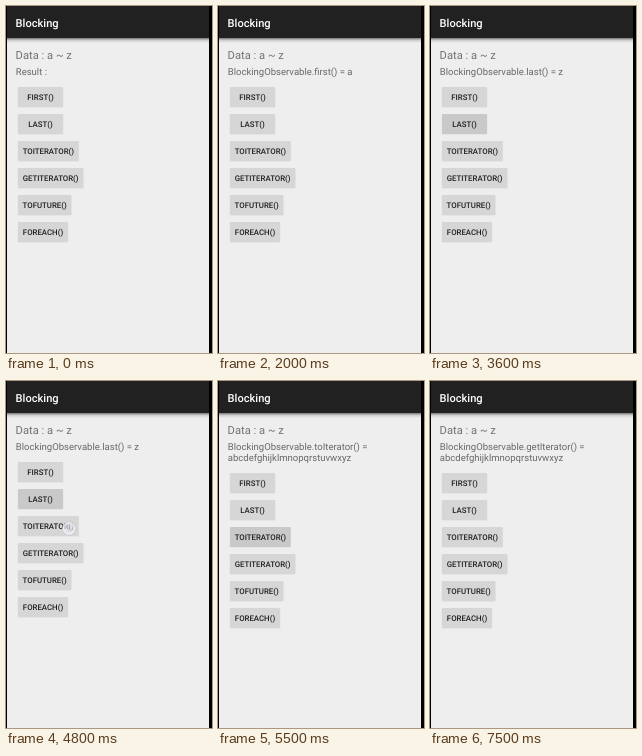
An HTML page that plays this animation: 206 px wide and 347 px high, repeating every 8000 ms.

```html
<!DOCTYPE html>
<html lang="en">
<head>
<meta charset="utf-8">
<title>Blocking</title>
<style>
html, body { margin: 0; width: 100%; height: 100%; overflow: hidden; background: #000; }
svg {
  display: block; width: 206px; height: 347px;
  font-family: Roboto, sans-serif; text-rendering: geometricPrecision;
}
.title { font-size: 11.1px; font-weight: 500; fill: #fff; }
.data { font-size: 11.2px; fill: #737373; }
.result { font-size: 9.52px; fill: #686868; }
.label { font-size: 7.84px; font-weight: 500; fill: #1f1f1f; text-anchor: middle; }
.button { fill: #d6d6d6; }
.edge { fill: #000; opacity: .05; }
.press { fill: #000; opacity: .06; }

/* one 8 s clock: 100 ms = 1.25% */
.result, .touch, .press, #list { animation: 8s step-end infinite; }
.result, .touch { opacity: 0; }

#r0 { animation-name: r0; }
#r1 { animation-name: r1; }
#r2 { animation-name: r2; }
#r3 { animation-name: r3; }
#r4 { animation-name: r4; }
@keyframes r0 { 0% { opacity: 1 } 22.5%, 100% { opacity: 0 } }
@keyframes r1 { 0% { opacity: 0 } 22.5% { opacity: 1 } 45%, 100% { opacity: 0 } }
@keyframes r2 { 0% { opacity: 0 } 45% { opacity: 1 } 68.75%, 100% { opacity: 0 } }
@keyframes r3 { 0% { opacity: 0 } 68.75% { opacity: 1 } 91.25%, 100% { opacity: 0 } }
@keyframes r4 { 0% { opacity: 0 } 91.25%, 100% { opacity: 1 } }

#list { animation-name: shift; }
@keyframes shift { 0% { transform: none } 68.75%, 100% { transform: translateY(11px) } }

#t0 { animation-name: t0; }
#t1 { animation-name: t1; }
#t2 { animation-name: t2; }
#t3 { animation-name: t3; }
@keyframes t0 {
  0% { opacity: 0 } 17.5% { opacity: 1 } 20% { opacity: .6 }
  21.25% { opacity: .25 } 22.5%, 100% { opacity: 0 }
}
@keyframes t1 {
  0% { opacity: 0 } 35% { opacity: 1 } 41.25% { opacity: .75 }
  42.5% { opacity: .5 } 43.75% { opacity: .25 } 45%, 100% { opacity: 0 }
}
@keyframes t2 {
  0% { opacity: 0 } 60% { opacity: 1 } 63.75% { opacity: .8 } 65% { opacity: .6 }
  66.25% { opacity: .4 } 67.5% { opacity: .25 } 68.75%, 100% { opacity: 0 }
}
@keyframes t3 {
  0% { opacity: 0 } 85% { opacity: 1 } 88.75% { opacity: .6 }
  90% { opacity: .25 } 91.25%, 100% { opacity: 0 }
}

/* ripple centres, measured from each button's corner */
#p0 { --at: 24.5px 9.5px; animation-name: p0; }
#p1 { --at: 27.5px 11.5px; animation-name: p1; }
#p2 { --at: 51px 12.5px; animation-name: p2; }
#p3 { --at: 52.5px 10.5px; animation-name: p3; }
@keyframes p0 {
  0% { clip-path: circle(0 at var(--at)) } 20% { clip-path: circle(16px at var(--at)) }
  21.25% { clip-path: circle(80px at var(--at)) } 25%, 100% { clip-path: circle(0 at var(--at)) }
}
@keyframes p1 {
  0% { clip-path: circle(0 at var(--at)) } 41.25% { clip-path: circle(12px at var(--at)) }
  42.5% { clip-path: circle(22px at var(--at)) } 43.75% { clip-path: circle(80px at var(--at)) }
  63.75%, 100% { clip-path: circle(0 at var(--at)) }
}
@keyframes p2 {
  0% { clip-path: circle(0 at var(--at)) } 63.75% { clip-path: circle(14px at var(--at)) }
  65% { clip-path: circle(28px at var(--at)) } 66.25% { clip-path: circle(45px at var(--at)) }
  67.5% { clip-path: circle(80px at var(--at)) } 71.25%, 100% { clip-path: circle(0 at var(--at)) }
}
@keyframes p3 {
  0% { clip-path: circle(0 at var(--at)) } 88.75% { clip-path: circle(24px at var(--at)) }
  90% { clip-path: circle(80px at var(--at)) } 93.75%, 100% { clip-path: circle(0 at var(--at)) }
}
</style>
</head>
<body>
<svg viewBox="0 0 206 347">
  <defs>
    <linearGradient id="shade" x2="0" y2="1">
      <stop stop-color="#000" stop-opacity=".5"/>
      <stop offset=".45" stop-color="#000" stop-opacity=".14"/>
      <stop offset="1" stop-color="#000" stop-opacity="0"/>
    </linearGradient>
    <radialGradient id="dot">
      <stop stop-color="#dcdee6" stop-opacity=".62"/>
      <stop offset=".55" stop-color="#e6e8f0" stop-opacity=".68"/>
      <stop offset=".8" stop-color="#fafaff" stop-opacity=".85"/>
      <stop offset="1" stop-color="#b6bac6" stop-opacity=".6"/>
    </radialGradient>
  </defs>
  <rect width="206" height="347"/>
  <rect x="1" width="202" height="347" fill="#eee"/>
  <rect x="1" width="202" height="32" fill="#212121"/>
  <rect x="1" y="32" width="202" height="5" fill="url(#shade)"/>
  <text class="title" x="9.6" y="21">Blocking</text>
  <text class="data" x="9.6" y="53.1">Data : a ~ z</text>

  <text class="result" id="r0" x="9.8" y="69.2">Result :</text>
  <text class="result" id="r1" x="9.8" y="69.2">BlockingObservable.first() = a</text>
  <text class="result" id="r2" x="9.8" y="69.2">BlockingObservable.last() = z</text>
  <text class="result" id="r3" x="9.8" y="69.2">BlockingObservable.toIterator() =<tspan x="9.8" dy="11">abcdefghijklmnopqrstuvwxyz</tspan></text>
  <text class="result" id="r4" x="9.8" y="69.2">BlockingObservable.getIterator() =<tspan x="9.8" dy="11">abcdefghijklmnopqrstuvwxyz</tspan></text>

  <g id="list"></g>

  <g fill="url(#dot)">
    <circle class="touch" id="t0" cx="36.5" cy="90.5" r="7"/>
    <circle class="touch" id="t1" cx="39.5" cy="119.5" r="7"/>
    <circle class="touch" id="t2" cx="63" cy="147.5" r="7"/>
    <circle class="touch" id="t3" cx="64.5" cy="183.5" r="7"/>
  </g>
</svg>
<script>
const buttons = [
  ["FIRST()", 45], ["LAST()", 45], ["TOITERATOR()", 60.7],
  ["GETITERATOR()", 65.3], ["TOFUTURE()", 53.3], ["FOREACH()", 50]
];

document.getElementById("list").innerHTML = buttons.map(([label, w], i) => {
  const y = 81 + 27 * i;
  const box = `x="12" y="${y}" width="${w}" height="20" rx="1.2"`;
  const press = i < 4 ? `<rect class="press" id="p${i}" ${box}/>` : "";
  return `<rect class="edge" x="11.6" y="${y}" width="${w + 0.8}" height="20.8" rx="1.4"/>
    <rect class="button" ${box}/>${press}
    <text class="label" x="${12 + w / 2}" y="${y + 12.7}">${label}</text>`;
}).join("");
</script>
</body>
</html>
```
